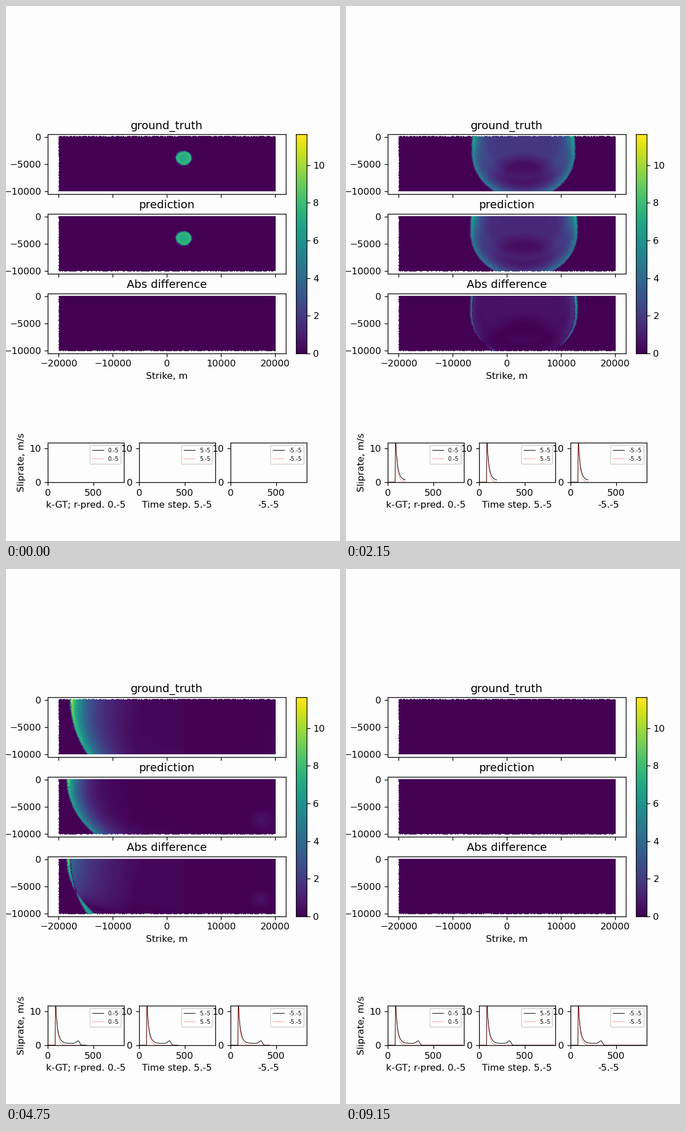
Recreate the animation shown at these times as a matplotlib script. Size 592 by 947 pixels, loop 9.2 s.

```python
import numpy as np
import matplotlib.pyplot as plt
from matplotlib.animation import FuncAnimation

W, H, DPI = 592, 947, 118.4
FRAMES, INTERVAL = 184, 50
VMAX, STEP = 11.63, 4.5
KM = 9.6                      # pixels per kilometre
COLS, ROWS = 384, 97
PAPER = "#fdfdfd"

rng = np.random.default_rng(4)
x = (np.arange(COLS) + 0.5 - 192.2)[None, :] / KM
depth = np.arange(ROWS)[:, None] / KM
xr = x - 3.0
grain = rng.normal(0, 1, (ROWS, COLS))
speckle = 1 + 0.06 * rng.normal(0, 1, (ROWS, COLS))

KEYS = [0, 27, 58, 75, 95, 115]
TRUTH = dict(
    a=[1.6, 6.5, 12.5, 16.6, 21.0, 25.4], b=[1.35, 5.4, 11.7, 16, 18.9, 20],
    peak=[2.5, 4.0, 5.2, 5.4, 6.0, 6.0], near=[0.4, 0.8, 1.0, 1.6, 1.9, 1.9],
    tail=[0, 1.7, 1.5, 1.6, 1.7, 1.5], boost=[0, 0.9, 0.9, 1.0, 0.8, 0.8],
    right=0.0, exit_r=79, exit_l=104)
MODEL = dict(
    a=[1.6, 6.7, 12.8, 17.0, 21.6, 26.2], b=[1.35, 5.4, 11.2, 14.9, 15.5, 16],
    peak=[2.5, 4.0, 5.0, 5.2, 5.6, 5.6], near=[0.4, 0.8, 1.3, 1.6, 1.9, 1.9],
    tail=[0, 1.7, 0.4, 0.3, 0.2, 0.1], boost=[0, 0.9, 1.0, 1.1, 0.9, 0.9],
    right=0.2, exit_r=77, exit_l=101)


def key(t, values):
    return np.interp(t, KEYS, values)


def blob(x0, d0, sx, sd):
    return np.exp(-((x - x0) / sx) ** 2 - ((depth - d0) / sd) ** 2)


def slip_rate(t, p):
    """Rupture front with a decaying wake and a healed core."""
    a = key(t, p["a"]) + np.where(xr > 0, p["right"] * min(t / 27, 1), 0)
    b = key(t, p["b"])
    mid = key(t, [4, 4, 2, 0, 0, 0])
    up = np.interp(t, [0, 17, 27, 58], [1.35, 4.0, 7.4, 30])
    dy = depth - mid
    rho = np.hypot(xr / a, np.where(dy > 0, dy / b, dy / up))
    s = (1 - rho) * a + 0.06 * grain
    inside = np.clip(s / 0.35, 0, 1)
    s = np.maximum(s, 0)

    reach = key(t, [1, 1.2, 5, 5, 5, 5])
    peak = key(t, p["peak"]) * (1 + key(t, p["boost"]) * np.exp(-depth / reach))
    v = peak * np.exp(-s / key(t, p["near"])) * speckle

    core_d = key(t, [4, 6.0, 7.3, 11.5, 11.5, 11.5])
    core_w = key(t, [0.5, 4.0, 6.0, 13.0, 14.0, 21])
    core_h = key(t, [0.5, 2.8, 2.8, 10.5, 30, 60])
    q = np.hypot(xr / core_w, (depth - core_d) / core_h)
    v = v + key(t, p["tail"]) * np.clip((q - 0.55) / 0.8, 0.12, 1)

    if 17 < t < 55:           # wave reflected from the free surface
        deep = 0.31 * (t - 17)
        r = np.hypot(xr / (0.9 * key(t, p["a"])), depth / deep)
        fade = np.clip((55 - t) / 28, 0, 1)
        v = v + fade * (0.6 * np.clip((1 - r) * 6, 0, 1)
                        + 1.2 * np.exp(-((r - 0.95) / 0.12) ** 2))
    v = v + 7 * np.exp(-t / 5)
    if t > p["exit_r"]:
        v = v * np.where(xr > 0, np.exp((p["exit_r"] - t) / 5), 1)
    if t > p["exit_l"]:
        v = v * np.exp((p["exit_l"] - t) / 4)
    return v * inside


def prediction(t):
    v = slip_rate(t, MODEL)
    band = np.exp(-((t - 56) / 10) ** 2)
    v = v + 1.0 * band * np.exp(-((depth - 7.8) / 1.3) ** 2 - (xr / 8) ** 4)
    v = v + 7 * np.exp(-((t - 75) / 2.5) ** 2) * blob(19.9, 1.1, 0.5, 0.6)
    ghost = np.exp(-((t - 85) / 12) ** 2)
    return v + 1.1 * ghost * blob(12.5 + 0.24 * (t - 75), 7.3, 1.8, 1.5)


def station_curves():
    n = np.arange(FRAMES) * STEP
    late = n - 90
    gt = 0.55 + 9 * np.exp(-late / 25) + 0.8 * np.exp(-((n - 99) / 4) ** 2)
    gt += 0.75 * np.exp(-((n - 335) / 28) ** 2)
    gt *= np.clip((372 - n) / 32, 0, 1)
    pred = 9.5 * np.exp(-late / 21)
    for c in (gt, pred):
        c[n < 83] = 0
        c[19:21] = 14, 12
    return n, gt, pred


fig = plt.figure(figsize=((W + 0.01) / DPI, (H + 0.01) / DPI), dpi=DPI,
                 facecolor=PAPER)


def box(left, top, width, height):
    return fig.add_axes([left / W, 1 - (top + height) / H, width / W, height / H],
                        facecolor=PAPER)


def ragged(side):
    """Opacity with a broken left column and one broken long edge."""
    m = np.ones((ROWS, COLS))
    m[:, 0] = rng.random(ROWS) < 0.5
    m[side] = np.repeat(rng.random(COLS // 2) < 0.65, 2)
    return m


def map_panel(title, top, img_top, side):
    ax = box(74, top, 422.4, 105.6)
    to_x = lambda px: -22000 + (px - 74) / KM * 1000
    to_y = lambda py: 500 - (py - top) / KM * 1000
    rgba = np.ones((ROWS, COLS, 4))
    im = ax.imshow(rgba, aspect="auto", interpolation="nearest", origin="upper",
                   extent=[to_x(93), to_x(93 + COLS),
                           to_y(img_top + ROWS), to_y(img_top)])
    ax.set(xlim=(-22000, 22000), ylim=(-10500, 500), title=title,
           xticks=np.arange(-20000, 20001, 10000), yticks=[0, -5000, -10000])
    return ax, im, ragged(side)


panels = [map_panel("ground_truth", 227.4, 231, 0),
          map_panel("prediction", 368.3, 373, -1),
          map_panel("Abs difference", 509.3, 514, -1)]
for ax, _, _ in panels[:2]:
    ax.tick_params(labelbottom=False)
panels[2][0].set_xlabel("Strike, m")

cmap = plt.get_cmap("viridis")
bar = box(513.8, 227.4, 19, 387.5)
bar.imshow(np.linspace(0, 1, 256)[:, None], cmap=cmap, aspect="auto",
           origin="lower", extent=[0, 1, 0, VMAX])
bar.set(xticks=[], yticks=range(0, 11, 2))
bar.yaxis.tick_right()

steps, gt_curve, pred_curve = station_curves()
lines = []
for i, (name, label) in enumerate([("0.-5", "k-GT; r-pred. 0.-5"),
                                   ("5.-5", "Time step. 5.-5"),
                                   ("-5.-5", "-5.-5")]):
    ax = box(74 + 161.95 * i, 773, 134.9, 70)
    k, = ax.plot([], [], "k-", lw=0.6, label=name)
    r, = ax.plot([], [], "r:", lw=0.6, label=name)
    ax.set(xlim=(0, 836), ylim=(0, VMAX), xticks=[0, 500], yticks=[0, 10],
           xlabel=label)
    ax.legend(loc="upper right", fontsize=6)
    if i == 0:
        ax.set_ylabel("Sliprate, m/s")
    lines.append((k, r))


def draw(i):
    truth, pred = slip_rate(i, TRUTH), prediction(i)
    if i == 0:
        pred = truth
    for (_, im, mask), v in zip(panels, (truth, pred, np.abs(truth - pred))):
        rgba = cmap(np.clip(v / VMAX, 0, 1))
        rgba[..., 3] = mask
        im.set_data(rgba)
    for k, r in lines:
        k.set_data(steps[:i + 1], gt_curve[:i + 1])
        r.set_data(steps[:i + 1], pred_curve[:i + 1])
    return []


anim = FuncAnimation(fig, draw, frames=FRAMES, interval=INTERVAL,
                     init_func=lambda: draw(0), repeat=True, repeat_delay=0)
plt.show()
```
